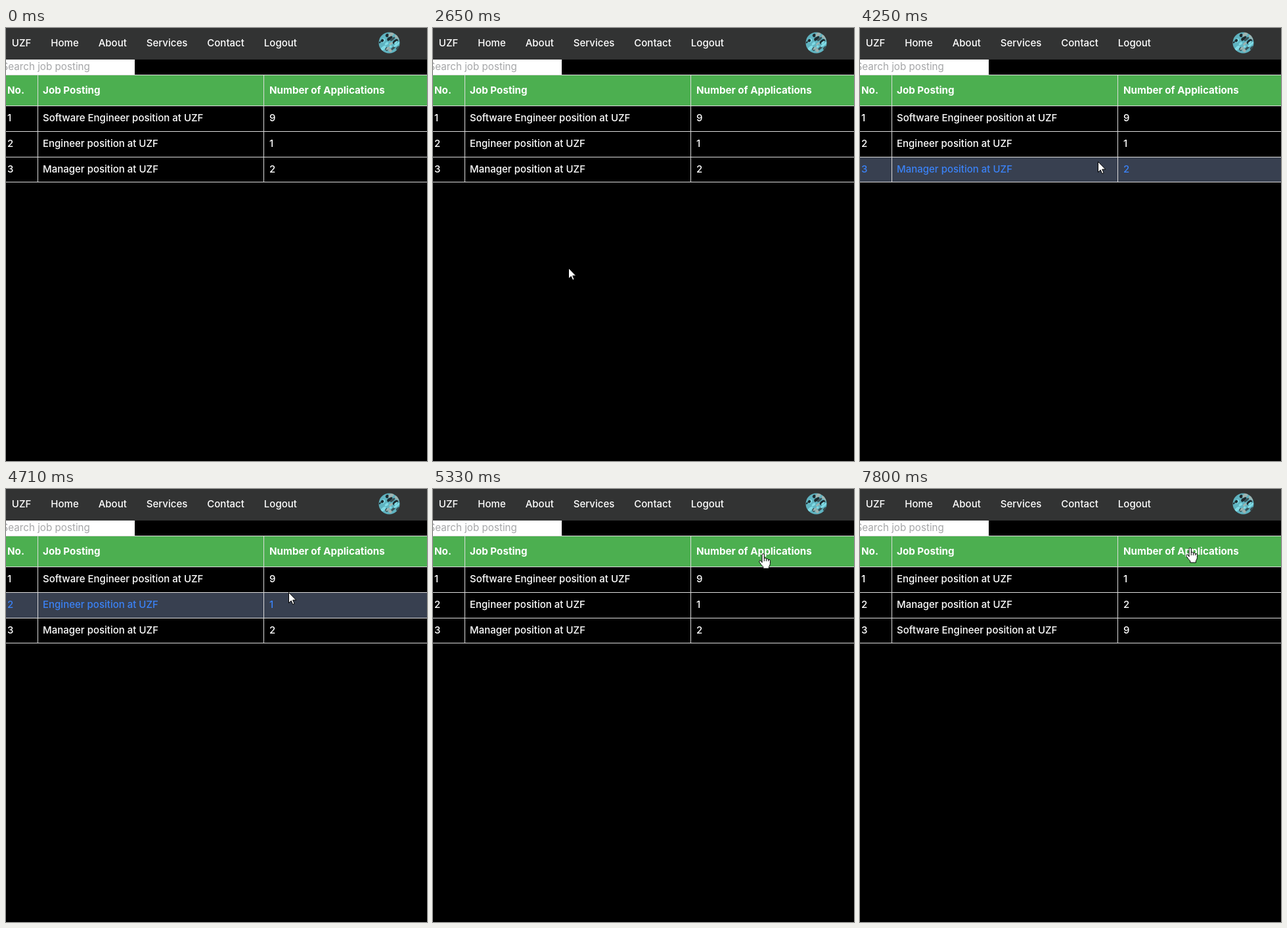
An HTML page with a canvas that plays this animation: 641x659 px, repeating every 8000 ms.

```html
<!DOCTYPE html>
<html lang="en">
<head>
<meta charset="utf-8">
<title>Job postings</title>
<style>
html, body { margin: 0; width: 100%; height: 100%; overflow: hidden; background: #000; }
canvas { display: block; }
</style>
</head>
<body>
<canvas id="stage" width="641" height="659"></canvas>
<script>
const W = 641, H = 659, LOOP = 8000;
const ctx = document.getElementById('stage').getContext('2d');

const BODY = '500 15px Inter, sans-serif';
const LIGHT = '400 15.2px Inter, sans-serif';
const BOLD = '700 15.2px Inter, sans-serif';

const NAV = ['UZF', 'Home', 'About', 'Services', 'Contact', 'Logout'];
const HEADS = ['No.', 'Job Posting', 'Number of Applications'];
const COLS = [2, 56, 401];
const JOBS = ['Software Engineer', 'Engineer', 'Manager'].map((role, i) => ({
  title: `${role} position at UZF`, count: [9, 1, 2][i]
}));

// Press and release times; each release toggles the sort direction
const CLICKS = [[6080, 6270], [7130, 7240], [7710, 7800]];

// Key points of the pointer: time, x, y
const PATH = [
  [280, 555, 650], [1030, 187, 480], [1190, 194, 446], [1890, 228, 400], [2650, 206, 365],
  [3890, 308, 239], [4710, 430, 157], [5310, 502, 98], [5740, 502, 89]
];

const rowTop = i => 118 + Math.round(i * 38.8);

function pointerAt(t) {
  if (t < PATH[0][0]) return null;
  const i = PATH.findIndex(p => p[0] > t);
  if (i < 0) return PATH.at(-1).slice(1);
  const [t0, x0, y0] = PATH[i - 1], [t1, x1, y1] = PATH[i];
  const k = (t - t0) / (t1 - t0);
  return [Math.round(x0 + (x1 - x0) * k), Math.round(y0 + (y1 - y0) * k)];
}

function jobsAt(t) {
  const sorts = CLICKS.filter(([, release]) => t >= release).length;
  if (!sorts) return JOBS;
  const dir = sorts % 2 ? 1 : -1;
  return [...JOBS].sort((a, b) => dir * (a.count - b.count));
}

function rect(color, x, y, w, h) {
  ctx.fillStyle = color;
  ctx.fillRect(x, y, w, h);
}

function text(str, x, y, color = '#fff', font = BODY) {
  ctx.font = font;
  ctx.fillStyle = color;
  ctx.fillText(str, x, y);
}

function disc(color, x, y, r) {
  ctx.fillStyle = color;
  ctx.beginPath();
  ctx.arc(x, y, r, 0, Math.PI * 2);
  ctx.fill();
}

function drawAvatar() {
  const colors = ['#1d2b30', '#9fb3b0', '#3b5257', '#7fdbe6'];
  let seed = 11;
  const rand = () => (seed = seed * 16807 % 2147483647) / 2147483647;
  ctx.save();
  ctx.beginPath();
  ctx.arc(583.5, 22.5, 16, 0, Math.PI * 2);
  ctx.clip();
  rect('#5fb3c0', 567, 6, 33, 33);
  for (let i = 0; i < 28; i++) {
    ctx.fillStyle = colors[i % colors.length];
    ctx.beginPath();
    ctx.ellipse(570 + rand() * 27, 9 + rand() * 27, 2 + rand() * 3, 1 + rand() * 2, -.7, 0, Math.PI * 2);
    ctx.fill();
  }
  ctx.restore();
}

function drawNav() {
  rect('#323333', 0, 0, W, 48);
  let x = 8.8;
  for (const label of NAV) {
    text(label, x, 28);
    x += ctx.measureText(label).width + 30;
  }
  drawAvatar();
  rect('#fff', 0, 48, 196, 23);
  text('Search job posting', -6.5, 64, '#a5a6a8', LIGHT);
}

function drawTable(jobs, hover) {
  rect('#4caf50', 0, 72, W, 46);
  HEADS.forEach((label, c) => text(label, COLS[c], 100, '#fff', BOLD));
  rect('#ddd', 0, 71, W, 1);

  jobs.forEach(({ title, count }, i) => {
    const y = rowTop(i), on = i === hover;
    if (on) rect('#384050', 0, y, W, rowTop(i + 1) - y);
    [i + 1, title, count].forEach((cell, c) => text(cell, COLS[c], y + 24, on ? '#3b82f6' : '#fff'));
    rect('#ddd', 0, y, W, 1);
  });

  rect('#ddd', 0, rowTop(jobs.length), W, 1);
  [48, 392].forEach(x => rect('#ddd', x, 71, 1, 164));
}

const ARROW = new Path2D('M.5 .5V16.6L4.2 13 6.7 18.6 9.1 17.6 6.7 12.1H11.7Z');
const HAND = new Path2D('M5 14V2.2Q5 .6 6.6 .6T8.3 2.2V7.2Q11 6.4 11.4 8.3 13.8 7.6 14.3 9.4 17.4 8.9 17.4 11.6V15.5Q17.4 18 15.4 20.4V23H6.8V20.6Q4 18 1 13.4 .2 11.4 1.8 10.9 3.2 10.5 5 13.6Z');
const FINGERS = new Path2D('M8.3 7V12M11.4 8.3V12M14.4 9.4V12');

function drawPointer(x, y, hand) {
  const shape = hand ? HAND : ARROW;
  ctx.save();
  ctx.translate(hand ? x - 6 : x, y);
  ctx.fillStyle = '#fff';
  ctx.strokeStyle = '#000';
  ctx.fill(shape);
  ctx.stroke(shape);
  if (hand) ctx.stroke(FINGERS);
  ctx.restore();
}

function draw(t) {
  const pos = pointerAt(t);
  const hover = JOBS.findIndex((_, i) => pos && pos[1] >= rowTop(i) && pos[1] < rowTop(i + 1));
  rect('#000', 0, 0, W, H);
  drawNav();
  drawTable(jobsAt(t), hover);
  if (!pos) return;
  drawPointer(...pos, pos[1] < rowTop(0));
  if (CLICKS.some(([press, release]) => t >= press && t < release)) disc('rgba(255, 255, 0, .47)', ...pos, 12);
}

let start;
function tick(now) {
  start ??= now;
  draw((now - start) % LOOP);
  requestAnimationFrame(tick);
}
draw(0);
requestAnimationFrame(tick);
</script>
</body>
</html>
```
